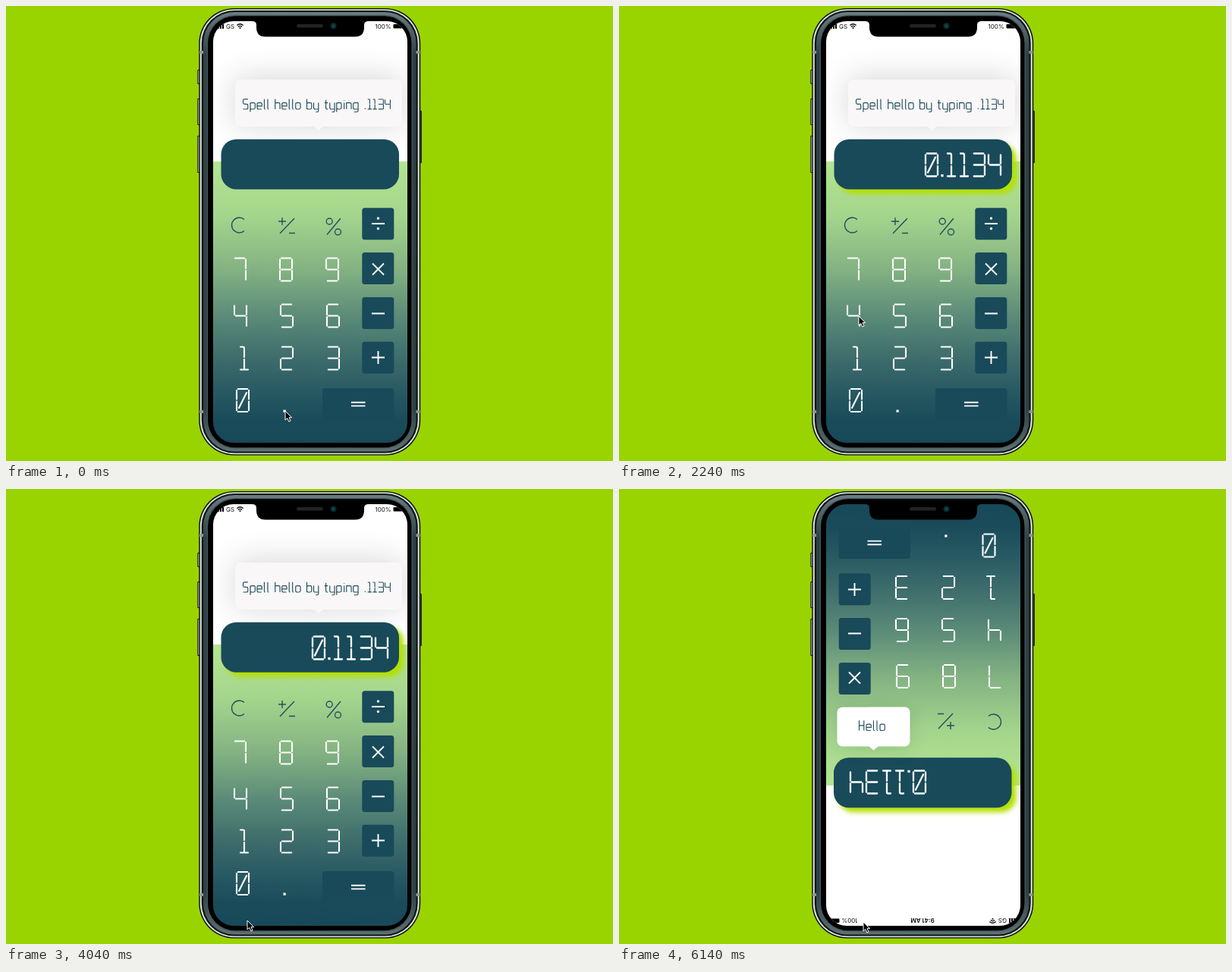
An HTML page with a canvas that plays this animation: 800x600 px, repeating every 6160 ms.

```html
<!DOCTYPE html>
<html lang="en">
<head>
<meta charset="utf-8">
<title>Calculator</title>
<style>
html, body { margin: 0; width: 100%; height: 100%; overflow: hidden; background: #99d400; }
canvas { display: block; width: 800px; height: 600px; }
</style>
</head>
<body>
<canvas id="stage" width="800" height="600" role="img" aria-label="Phone calculator. Spell hello by typing .1134. Turn it upside down. Hello"></canvas>
<script>
const ctx = document.getElementById('stage').getContext('2d');
const LOOP = 6160, FLIP = 5740, HINT = 4380;
const TEAL = '#184a5a', INK = '#22505e', WHITE = '#fff';
const SANS = 'Inter, "Liberation Sans", sans-serif';

// Seven segments on a 16 x 30 cell
const SEG = {
  a: 'M1.8 0H14.2', b: 'M16 1.8V13.4', c: 'M16 16.6V28.2', d: 'M1.8 30H14.2',
  e: 'M0 16.6V28.2', f: 'M0 1.8V13.4', g: 'M1.8 15H14.2'
};
const DIGITS = {
  0: 'abcdef', 2: 'abged', 3: 'abgcd', 4: 'fgbc', 5: 'afgcd',
  6: 'afgcde', 7: 'abc', 8: 'abcdefg', 9: 'abcdfg'
};
const digitPaths = {};
for (const n in DIGITS) {
  digitPaths[n] = new Path2D([...DIGITS[n]].map(s => SEG[s]).join('') + (n === '0' ? 'M3 25L13 5' : ''));
}
digitPaths[1] = new Path2D('M3 0H6.2Q8 0 8 1.8V13.4M8 16.6V30M3 30H13');

// Thin rounded letters: [advance, path], baseline at y = 0
const BOWL = 'M2 0H5Q7 0 7-2V-7Q7-9 5-9H2Q0-9 0-7V-2Q0 0 2 0';
const LETTERS = {
  S: [9.5, 'M7-14H2Q0-14 0-12V-9Q0-7 2-7H5Q7-7 7-5V-2Q7 0 5 0H0'],
  T: [9, 'M0-14H8M4-14V0'],
  H: [9.5, 'M0-14V0M7-14V0M0-7H7'],
  p: [9, BOWL + 'M0-9V4'],
  b: [9, BOWL + 'M0-14V0'],
  d: [9, BOWL + 'M7-14V0'],
  o: [9, BOWL],
  e: [9, 'M0-4.5H7V-7Q7-9 5-9H2Q0-9 0-7V-2Q0 0 2 0H6.5'],
  l: [4.5, 'M.5-14V-1.5Q.5 0 2 0'],
  h: [9, 'M0-14V0M0-9H5Q7-9 7-7V0'],
  n: [9, 'M0 0V-9H5Q7-9 7-7V0'],
  r: [7, 'M0 0V-7Q0-9 2-9H5'],
  u: [9, 'M0-9V-2Q0 0 2 0H7V-9'],
  y: [9, 'M0-9V-2Q0 0 2 0H7M7-9V2Q7 4 5 4H3'],
  g: [9, 'M7-9H2Q0-9 0-7V-2Q0 0 2 0H7M7-9V2Q7 4 5 4H1'],
  t: [6.5, 'M1.5-13V-2Q1.5 0 3.5 0H4.5M-.5-9H4.5'],
  i: [4, 'M1-9V0M1-12.6V-11.6'],
  s: [9, 'M7-9H2Q0-9 0-7V-6Q0-4.5 2-4.5H5Q7-4.5 7-3V-2Q7 0 5 0H0'],
  w: [11, 'M0-9V-2Q0 0 2 0H7Q9 0 9-2V-9M4.5-8V0'],
  '.': [4.5, 'M1-1.2V0'],
  ' ': [5.75, '']
};
for (const k in LETTERS) LETTERS[k][1] = new Path2D(LETTERS[k][1]);

function box(x, y, w, h, r, fill) {
  ctx.beginPath();
  ctx.roundRect(x, y, w, h, r);
  ctx.fillStyle = fill;
  ctx.fill();
}

function shape(d, color, width) {
  ctx.strokeStyle = color;
  ctx.lineWidth = width;
  ctx.stroke(new Path2D(d));
}

function disc(x, y, r, color) {
  ctx.beginPath();
  ctx.arc(x, y, r, 0, 7);
  ctx.fillStyle = color;
  ctx.fill();
}

function shadow(color, blur, dx, dy) {
  ctx.shadowColor = color;
  ctx.shadowBlur = blur;
  ctx.shadowOffsetX = dx;
  ctx.shadowOffsetY = dy;
}

function clearShadow() { shadow('transparent', 0, 0, 0); }

function digit(n, cx, top, color = WHITE, scale = 1, width = 2.1) {
  ctx.save();
  ctx.translate(cx - 8 * scale, top);
  ctx.scale(scale, scale);
  ctx.lineCap = 'round';
  ctx.strokeStyle = color;
  ctx.lineWidth = width / scale;
  ctx.stroke(digitPaths[n]);
  ctx.restore();
}

function words(text, x, base) {
  for (const ch of text) {
    if (ch >= '0' && ch <= '9') {
      const adv = ch === '1' ? 6.75 : 9;
      digit(ch, x + (adv - 2) / 2, base - 13, INK, 0.43, 1.15);
      x += adv;
      continue;
    }
    const [adv, path] = LETTERS[ch];
    ctx.save();
    ctx.translate(x, base);
    ctx.scale(0.9, 0.94);
    ctx.strokeStyle = INK;
    ctx.lineWidth = 1.3;
    ctx.stroke(path);
    ctx.restore();
    x += adv;
  }
}

function readout(text, right) {
  for (const ch of [...text].reverse()) {
    const adv = ch === '.' ? 7 : ch === '1' ? 17 : 21;
    const cx = right - adv / 2;
    if (ch === '.') box(cx - 1.6, 222, 3.2, 3.2, 0, WHITE);
    else digit(ch, cx, 194.5, WHITE, 1, 2.3);
    right -= adv;
  }
}

function bubble(x, y, w, h, tail, fill) {
  ctx.beginPath();
  ctx.roundRect(x, y, w, h, 7);
  ctx.moveTo(tail - 6, y + h);
  ctx.lineTo(tail, y + h + 5);
  ctx.lineTo(tail + 6, y + h);
  ctx.fillStyle = fill;
  ctx.fill();
}

function sideButton(x, y, h) {
  box(x, y, 4.5, h, 1, '#0d1412');
  box(x + 1, y + 1, 2, h - 2, 0, '#b9c4b6');
}

function phone() {
  sideButton(252.3, 84, 19);
  sideButton(252.3, 122, 35);
  sideButton(252.3, 171, 49);
  sideButton(543.4, 138, 69);
  box(254.3, 3, 291.9, 589.5, 46, '#060908');
  box(255.7, 4.3, 289.1, 586.9, 45, '#d9e0d9');
  box(257.8, 6, 284.9, 583.5, 43, '#0c1414');
  const metal = ctx.createLinearGradient(0, 6, 0, 590);
  metal.addColorStop(0, '#6d8084');
  metal.addColorStop(0.1, '#2d4144');
  metal.addColorStop(0.9, '#2d4144');
  metal.addColorStop(1, '#5f7276');
  box(260, 8, 280.5, 579.5, 41, metal);
  box(264.6, 12, 271.3, 571.5, 37, '#46585b');
  box(266, 13.2, 268.5, 569.1, 36, '#000');
  for (const y of [59, 533]) {
    box(255, y, 5, 4, 0, '#8b9791');
    box(540.5, y, 5, 4, 0, '#8b9791');
  }
}

function status() {
  for (let i = 0; i < 4; i++) box(276 + i * 3, 28 - i * 1.6, 2, 2 + i * 1.6, 0.4, '#000');
  ctx.fillStyle = '#111';
  ctx.textBaseline = 'alphabetic';
  ctx.font = '8px ' + SANS;
  ctx.textAlign = 'left';
  ctx.fillText('GS', 290, 30);
  ctx.fillText('100%', 486.5, 30);
  ctx.font = '600 8px ' + SANS;
  ctx.textAlign = 'center';
  ctx.fillText('9:41 AM', 401, 30);
  shape('M304.3 25.5Q308.5 22 312.7 25.5M305.8 27.4Q308.5 25.2 311.2 27.4', '#111', 1.3);
  disc(308.5, 29, 1.1, '#111');
  box(510.5, 24, 12, 5.5, 1.2, '#000');
}

function keys(turned) {
  const dx = turned ? -3 : 0, dy = turned ? 1.5 : 0;
  shape('M314 281.5Q311.5 279 307.5 279A10 10 0 0 0 307.5 299Q311.5 299 314 296.5', INK, 1.4);
  shape('M359 284H369M364 279V289M361 300L380 280M373 299.5H381', INK, 1.4);
  shape('M423 301.5L441 280', INK, 1.4);
  shape('M430.2 284a4 4 0 1 1-8 0a4 4 0 1 1 8 0M441.5 298a4 4 0 1 1-8 0a4 4 0 1 1 8 0', INK, 1.4);

  const rows = [['789', 308, 332.5], ['456', 309, 393.5], ['123', 314, 449.5]];
  for (const [set, x, y] of rows) {
    digit(set[0], x + dx, y + dy);
    digit(set[1], (y < 350 ? 369 : 370) + dx, y + dy);
    digit(set[2], (y < 350 ? 430 : 431) + dx, y + dy);
  }
  digit(0, 312 + (turned ? 1.5 : 0), 505 + dy);
  box(365.5 - dx, 532.5, 3.2, 3.2, 0, WHITE);

  for (let i = 0; i < 4; i++) box(469.3, 266.3 + i * 58.8, 42, 42, 3.5, TEAL);
  box(417, 504, 94.5, 42, 3.5, TEAL);
  shape('M482 287H499', WHITE, 1.9);
  disc(490.5, 280, 1.7, WHITE);
  disc(490.5, 293.5, 1.7, WHITE);
  shape('M483 339.5L498 354.5M498 339.5L483 354.5', WHITE, 1.9);
  shape('M482 405.5H499', WHITE, 1.9);
  shape('M482 463.5H499M490.5 455V472', WHITE, 1.9);
  shape('M455 522.8H473.5M455 527.4H473.5', WHITE, 1.9);
}

const shade = ctx.createLinearGradient(0, 205, 0, 576);
[[0, '#b4e691'], [0.2, '#a3d48c'], [0.38, '#84b382'], [0.55, '#5b8b78'],
 [0.7, '#3d6c6b'], [0.82, '#275963'], [0.92, '#194b5a'], [1, '#174959']]
  .forEach(([p, c]) => shade.addColorStop(p, c));

const PRESSES = [[200, '0.'], [560, '0.1'], [760, '0.11'], [1300, '0.113'], [1950, '0.1134']];

function entered(t) {
  let value = '';
  for (const [at, text] of PRESSES) if (t >= at) value = text;
  return value;
}

function screen(t) {
  const turned = t >= FLIP, value = entered(t);
  ctx.save();
  ctx.beginPath();
  ctx.roundRect(273, 20, 256, 556, 27);
  ctx.clip();

  ctx.save();
  if (turned) {
    ctx.translate(801, 596);
    ctx.scale(-1, -1);
  }
  ctx.fillStyle = WHITE;
  ctx.fillRect(270, 10, 262, 196);
  ctx.fillStyle = shade;
  ctx.fillRect(270, 205, 262, 382);
  status();
  if (!turned) {
    shadow('rgba(40,30,30,.19)', 42, 0, -2);
    bubble(302, 97, 220, 62, 412, '#f9f7f7');
    clearShadow();
    if (t < HINT) words('Spell hello by typing .1134', 312.5, 136);
    else words('Turn it upside down.', 326.5, 137);
  }
  // Canvas shadows ignore the transform, so the glow always falls down-right
  if (value) shadow('#b4e000', 6, 6, 6);
  box(283.5, 175.7, 234.5, 66, 20, TEAL);
  clearShadow();
  readout(value, turned ? 498.5 : 505.5);
  keys(turned);
  ctx.restore();

  if (turned) {
    shadow('rgba(30,70,50,.16)', 24, 0, 2);
    bubble(287.5, 287.5, 96, 52, 335.5, WHITE);
    clearShadow();
    words('Hello', 316.5, 318.5);
  }
  ctx.restore();
}

function notch() {
  ctx.fillStyle = '#000';
  ctx.fill(new Path2D('M324 18V20Q330 20 330 25V28Q330 40.5 342 40.5H460Q472 40.5 472 28V25Q472 20 478 20V18Z'));
  box(383, 24, 35, 4.5, 2.2, '#202423');
  disc(431.5, 26.3, 4, '#0b2a2e');
  disc(431.5, 26.3, 1.7, '#1d4a4c');
}

const PATH = [
  [0, 368, 534], [220, 368, 534], [520, 314, 468], [800, 314, 468],
  [1120, 427, 466], [1380, 427, 466], [1800, 316, 409], [2300, 316, 409],
  [2720, 324, 584], [3640, 324, 584], [3900, 318, 569], [FLIP, 318, 569],
  [6080, 322, 571], [LOOP, 322, 571]
];

function pointerAt(t) {
  let i = 1;
  while (t > PATH[i][0]) i++;
  const [t0, x0, y0] = PATH[i - 1], [t1, x1, y1] = PATH[i];
  const p = (t - t0) / (t1 - t0), e = p * p * (3 - 2 * p);
  return [x0 + (x1 - x0) * e, y0 + (y1 - y0) * e];
}

const ARROW = new Path2D('M0 0V12L2.8 9.5L4.8 14L7 13L5 8.7H8.6Z');
const HAND = new Path2D('M-1 1Q0-.5 1 1V5L7 6Q8 6 8 8L7 11V13.5H0V11.5L-3.5 8Q-3.5 6.5-2 7L-1 8Z');

function pointer(t) {
  const hand = t > 400 && t < 1950;
  const [x, y] = pointerAt(t);
  ctx.save();
  ctx.translate(x, y);
  ctx.lineJoin = 'round';
  ctx.lineWidth = 1;
  ctx.fillStyle = hand ? WHITE : '#000';
  ctx.strokeStyle = hand ? '#000' : WHITE;
  const path = hand ? HAND : ARROW;
  ctx.fill(path);
  ctx.stroke(path);
  if (hand) shape('M3 5.5V8M5.2 6V8.2', '#000', 0.8);
  ctx.restore();
}

function draw(now) {
  const t = now % LOOP;
  ctx.fillStyle = '#99d400';
  ctx.fillRect(0, 0, 800, 600);
  phone();
  screen(t);
  notch();
  pointer(t);
}

const start = performance.now();
function tick() {
  draw(performance.now() - start);
  requestAnimationFrame(tick);
}
tick();
</script>
</body>
</html>
```
